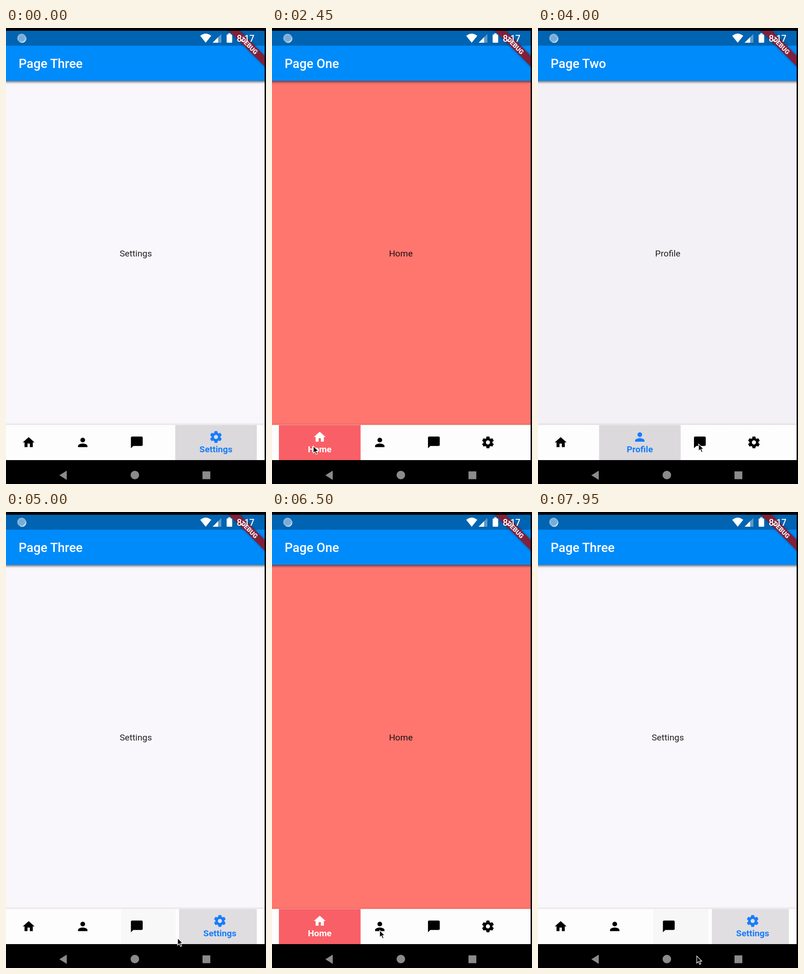
An HTML page for the animation above (8000 ms loop, 565 by 992 pixels).

```html
<!DOCTYPE html>
<html lang="en">
<head>
<meta charset="utf-8">
<title>Bottom navigation</title>
<style>
  html, body { margin: 0; width: 100%; height: 100%; overflow: hidden; background: #000; }
  svg { display: block; font-family: Roboto, sans-serif; }
  #stage { width: 100vw; height: 100vh; }
  .label { font-size: 19.2px; font-weight: 700; text-anchor: middle; }
</style>
</head>
<body>
<svg id="stage" viewBox="0 0 565 992">
  <defs>
    <clipPath id="screen"><rect y="6" width="562" height="934"/></clipPath>
    <filter id="soft" x="-10%" y="-50%" width="120%" height="200%"><feGaussianBlur stdDeviation="2.6"/></filter>
    <linearGradient id="barShadow" x2="0" y2="1">
      <stop offset="0" stop-opacity="0"/><stop offset="1" stop-opacity=".1"/>
    </linearGradient>
    <path id="home" d="M10 20v-6h4v6h5v-8h3L12 3 2 12h3v8z"/>
    <path id="profile" d="M12 12a4 4 0 1 0 0-8 4 4 0 0 0 0 8zm0 2c-2.67 0-8 1.34-8 4v2h16v-2c0-2.66-5.33-4-8-4z"/>
    <path id="chat" d="M20 2H4a2 2 0 0 0-2 2v18l4-4h14a2 2 0 0 0 2-2V4a2 2 0 0 0-2-2z"/>
    <path id="tooth" d="M10 2h4q.4 0 .5.4l.6 4.2H8.9l.6-4.2q.1-.4.5-.4z"/>
    <g id="settings">
      <circle cx="12" cy="12" r="5.6" fill="none" stroke="currentColor" stroke-width="4.2"/>
    </g>
  </defs>

  <rect width="565" height="992"/>
  <g clip-path="url(#screen)">
    <rect id="page" y="100" width="562" height="770"/>
    <text id="body" y="496.5" font-size="19.2" text-anchor="middle" fill="#000" fill-opacity=".87"></text>

    <rect x="-8" y="45" width="578" height="72.5" fill-opacity=".6" filter="url(#soft)"/>
    <rect y="6" width="562" height="109" fill="#008bfb"/>
    <rect y="6" width="562" height="32.5" fill="#0064b2"/>
    <text id="title" x="27.5" y="87" font-size="27.4" font-weight="500" fill="#fff"></text>

    <rect y="859" width="562" height="4.5" fill="url(#barShadow)"/>
    <rect y="863.5" width="562" height="77" fill="#fdfdfd"/>
    <g id="tiles"></g>

    <g transform="translate(562 6) rotate(45)">
      <rect x="-60" y="38.4" width="120" height="16.4" filter="url(#soft)" opacity=".45"/>
      <rect x="-60" y="38.4" width="120" height="16.4" fill="#80203a"/>
      <text y="51.6" font-size="14" font-weight="900" text-anchor="middle" fill="#fff" fill-opacity=".92">DEBUG</text>
    </g>

    <g fill="#fff">
      <circle cx="34" cy="22" r="9.5" fill="#78acd8"/>
      <g id="rays" stroke="#c5dcf0" stroke-width=".8"></g>
      <path d="M43 18a9.5 9.5 0 0 1-14 12.3A10.5 10.5 0 0 0 43 18z" fill-opacity=".85"/>
      <path d="M422 17q12-9.500 24 0l-12 15z"/>
      <path d="M468 13v19h-19z" fill-opacity=".35"/>
      <path d="M461 20v12h-12z"/>
      <path d="M483 14v-2.500h5V14h2q1.500 0 1.500 1.500v15q0 1.500-1.500 1.500h-9q-1.500 0-1.500-1.500v-15q0-1.500 1.500-1.500z"/>
      <text x="501.500" y="29.500" font-size="19.500" font-weight="500">8:17</text>
    </g>
  </g>

  <g fill="#8b8b8b">
    <path d="M116 973l16-10v20z"/>
    <circle cx="280" cy="972.5" r="9.300"/>
    <rect x="427" y="964.500" width="17" height="17"/>
  </g>
  <g id="cursor">
    <path d="M0 0V15.500l3.600-3.400 2.700 6 2.600-1.100-2.600-5.900H11z" stroke="#fff" stroke-width="1.200"/>
  </g>
</svg>

<script>
const LOOP = 8000, RESIZE = 270;
const SLIM = 110, WIDE = 177.5, GAP = 7.5, ICON_BOX = 68.5, LEFT = 15;

const pages = [
  { icon: 'home', label: 'Home', title: 'Page One', bg: '#ff766f', tile: '#f95f66', ink: '#fff', x: 280 },
  { icon: 'profile', label: 'Profile', title: 'Page Two', bg: '#f3f1f5', tile: '#dbd9dc', ink: '#177dfb', x: 282 },
  { icon: 'chat', label: 'Chat', title: 'Page Three', bg: '#f9f7fb', tile: '#dbd9dc', ink: '#177dfb', x: 281 },
  { icon: 'settings', label: 'Settings', title: 'Page Three', bg: '#f9f7fb', tile: '#dbd9dc', ink: '#177dfb', x: 282 },
];

// [time, selected page]
const taps = [[-RESIZE, 3], [1950, 0], [3400, 1], [4150, 2], [4765, 3], [5750, 0], [6600, 1], [7150, 2], [7722, 3]];

// [time, x, y] of the pointer tip
const pointer = [
  [1150, 11, 992], [1550, 47, 911], [2250, 47, 911], [2900, 235, 904], [3430, 235, 904],
  [3850, 349, 905], [4180, 349, 905], [4600, 468, 906], [4790, 468, 906], [5000, 373, 927],
  [5125, 300, 937], [5600, 50, 911], [6000, 50, 911], [6400, 234, 910], [6630, 234, 910],
  [6950, 350, 908], [7180, 350, 908], [7500, 468, 908], [7740, 468, 908], [7950, 345, 966], [8000, 345, 966],
];

const $ = id => document.getElementById(id);
const set = (node, attrs) => { for (const k in attrs) node.setAttribute(k, attrs[k]); };
const repeat = (n, make) => Array.from({ length: n }, (_, i) => make(i)).join('');
const smooth = p => p * p * (3 - 2 * p);

$('settings').innerHTML += repeat(6, i => `<use href="#tooth" transform="rotate(${i * 60} 12 12)"/>`);
$('rays').innerHTML = repeat(16, i => `<path d="M34 15.500v-3" transform="rotate(${i * 22.5} 34 22)"/>`);
$('tiles').innerHTML = pages.map(p => `
  <svg y="863.5" height="76.5">
    <rect width="180" height="77" fill="${p.tile}"/>
    <g fill="currentColor"><use href="#${p.icon}"/></g>
    <text class="label" x="${WIDE / 2}" y="59" fill="${p.ink}">${p.label}</text>
  </svg>`).join('');
const tiles = [...$('tiles').children];

function drawTiles(current, previous, progress) {
  let x = LEFT;
  tiles.forEach((tile, i) => {
    const active = i === current;
    const grow = active ? progress : i === previous ? 1 - progress : 0;
    const width = SLIM + (WIDE - SLIM) * grow;
    const [fill, icon, label] = tile.children;
    const center = (active ? WIDE : ICON_BOX) / 2;
    set(tile, { x, width });
    set(fill, { opacity: grow });
    set(icon, {
      color: active ? pages[i].ink : '#000',
      transform: `translate(${center} ${active ? 26.2 : 38}) scale(1.28) translate(-12 -12)`,
    });
    set(label, { visibility: active ? 'visible' : 'hidden' });
    x += width + GAP;
  });
}

function drawPointer(t) {
  const next = pointer.findIndex(k => k[0] > t);
  set($('cursor'), { visibility: next > 0 ? 'visible' : 'hidden' });
  if (next < 1) return;
  const [t0, x0, y0] = pointer[next - 1], [t1, x1, y1] = pointer[next];
  const p = smooth((t - t0) / (t1 - t0));
  set($('cursor'), { transform: `translate(${x0 + (x1 - x0) * p} ${y0 + (y1 - y0) * p})` });
}

function draw(t) {
  const n = taps.filter(tap => tap[0] <= t).length - 1;
  const [start, current] = taps[n];
  const page = pages[current];
  set($('page'), { fill: page.bg });
  set($('body'), { x: page.x });
  $('body').textContent = page.label;
  $('title').textContent = page.title;
  drawTiles(current, n ? taps[n - 1][1] : -1, Math.min(1, (t - start) / RESIZE));
  drawPointer(t);
}

const begin = performance.now();
function frame() {
  draw((performance.now() - begin) % LOOP);
  requestAnimationFrame(frame);
}
frame();
</script>
</body>
</html>
```
